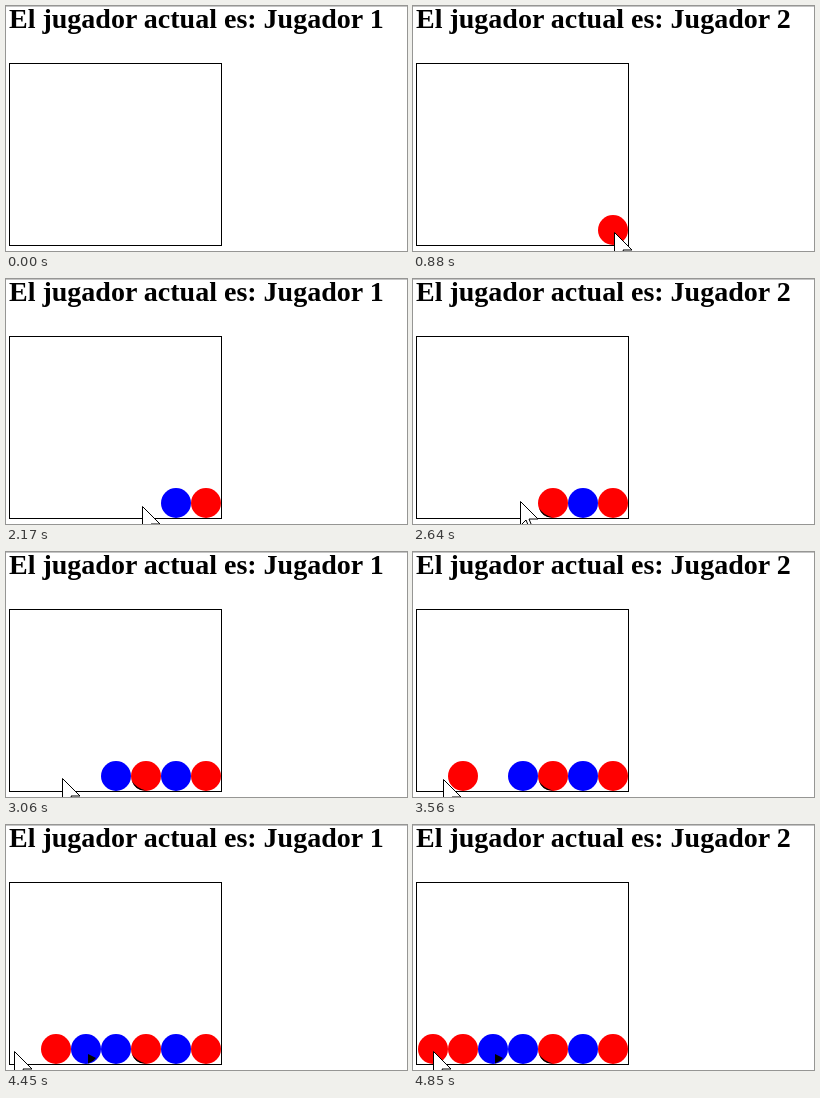
An HTML page for the animation above (5450 ms loop, 401 by 245 pixels).

```html
<!DOCTYPE html>
<html lang="es">
<head>
<meta charset="utf-8">
<title>Jugador actual</title>
<style>
  html, body { margin: 0; width: 100%; height: 100%; overflow: hidden; background: #fff; }
  svg { display: block; width: 401px; height: 245px; }
  text { font: bold 28px "Liberation Serif", "Times New Roman", serif; }
</style>
</head>
<body>
<svg viewBox="0 0 401 245">
  <path d="M0 .5H401" stroke="#c4c4c4"/>
  <text id="title" x="3" y="22"></text>
  <rect x="3.5" y="57.5" width="212" height="182" fill="none" stroke="#000"/>
  <g id="discs"></g>
  <path id="cursor" d="M0 0V24L5.5 18.5L9 27L12 26L8.5 17.5H17.5Z" fill="#fff" stroke="#000"/>
</svg>
<script>
const LOOP = 5450;
const REFRESH = 1000 / 15;
const REFRESH_PHASE = 18;
const POINTER_START = 130;
const CELL = 30;
const SVG_NS = 'http://www.w3.org/2000/svg';
const title = document.getElementById('title');
const discLayer = document.getElementById('discs');
const cursor = document.getElementById('cursor');

const turns = [
  { at: 740, column: 6 },
  { at: 1685, column: 5 },
  { at: 2230, column: 4, shade: 'M-14 5Q-10 12 0 14.5Q-11 15 -14 5Z' },
  { at: 2710, column: 3 },
  { at: 3220, column: 1 },
  { at: 4100, column: 2, shade: 'M2 5L10 9Q7 13 2 14.5Z' },
  { at: 4850, column: 0 }
];

// Where the pointer rests or turns
const stops = [
  { at: 130, x: 255, y: 229 },
  { at: 200, x: 211, y: 225 },
  { at: 410, x: 201, y: 226 },
  { at: 740, x: 201, y: 226 },
  { at: 1420, x: 196, y: 234 },
  { at: 2170, x: 136, y: 227 },
  { at: 2640, x: 107, y: 222 },
  { at: 3060, x: 55, y: 226 },
  { at: 3220, x: 55, y: 226 },
  { at: 3560, x: 30, y: 227 },
  { at: 4050, x: 82, y: 228 },
  { at: 4450, x: 7, y: 226 },
  { at: 4720, x: 20, y: 226 }
];

const smooth = k => k * k * (3 - 2 * k);
const mix = (a, b, k) => Math.round(a + (b - a) * k);

function add(parent, tag, attributes) {
  const node = document.createElementNS(SVG_NS, tag);
  for (const name in attributes) node.setAttribute(name, attributes[name]);
  return parent.appendChild(node);
}

turns.forEach((turn, i) => {
  const x = 20 + CELL * turn.column;
  turn.node = add(discLayer, 'g', { transform: `translate(${x} 224)` });
  add(turn.node, 'circle', { r: CELL / 2, fill: i % 2 ? '#00f' : '#f00' });
  if (turn.shade) add(turn.node, 'path', { d: turn.shade });
});

function pointerAt(time) {
  const next = stops.findIndex(stop => stop.at > time);
  if (next < 0) return stops[stops.length - 1];
  const from = stops[Math.max(0, next - 1)];
  const to = stops[next];
  const k = smooth(Math.max(0, (time - from.at) / (to.at - from.at)));
  return { x: mix(from.x, to.x, k), y: mix(from.y, to.y, k) };
}

function draw(time) {
  let played = 0;
  for (const turn of turns) {
    const visible = time >= turn.at;
    turn.node.style.display = visible ? '' : 'none';
    played += visible;
  }
  title.textContent = `El jugador actual es: Jugador ${1 + played % 2}`;

  const refreshed = Math.floor((time - REFRESH_PHASE) / REFRESH) * REFRESH + REFRESH_PHASE;
  const { x, y } = pointerAt(refreshed);
  cursor.style.display = time < POINTER_START ? 'none' : '';
  cursor.setAttribute('transform', `translate(${x + 0.5} ${y + 0.5})`);
}

const begin = performance.now();
function frame() {
  draw((performance.now() - begin) % LOOP);
  requestAnimationFrame(frame);
}
frame();
</script>
</body>
</html>
```
